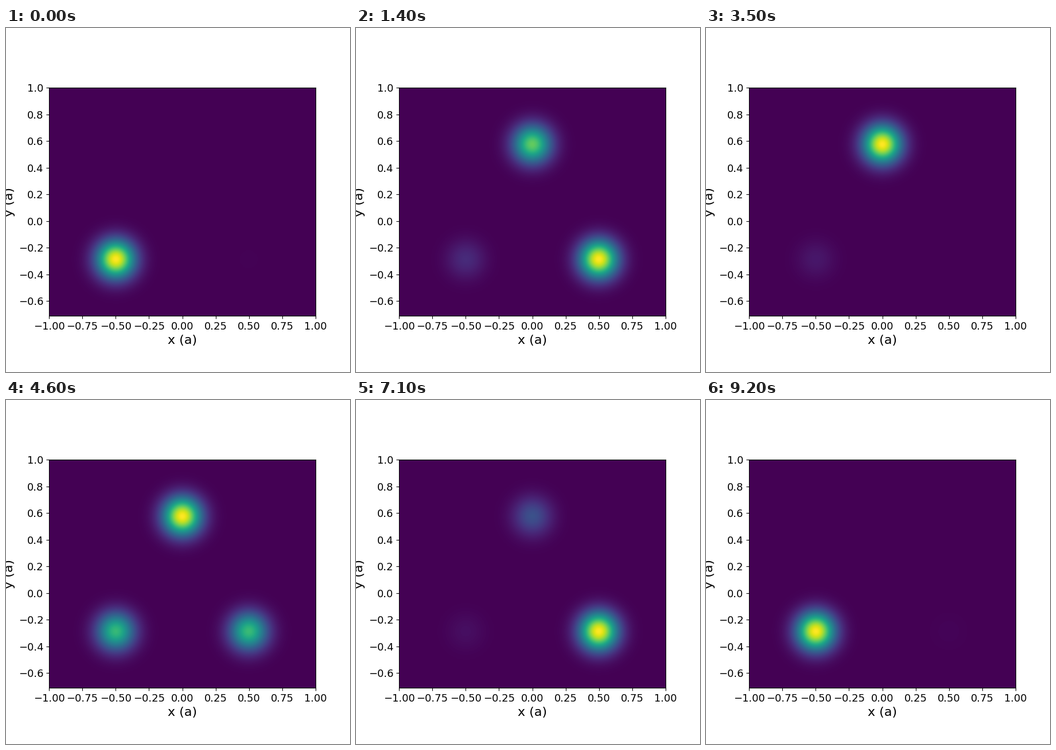
Recreate the animation shown at these times as a matplotlib script. Size 600 px wide and 600 px high, loop 9.3 s.

```python
import numpy as np
import matplotlib.pyplot as plt
from matplotlib.animation import FuncAnimation

FRAMES, INTERVAL = 93, 100
SIGMA = 0.1
HEIGHT = np.sqrt(3) / 6
Y_LOW = HEIGHT - 1

# Each site of the triangle fills in smooth pulses: (centre, width) in frames.
SITES = {
    (-0.5, -HEIGHT): [(0, 6), (24, 6.6), (44, 3.2), (77, 3.3), (93, 5)],
    (0.5, -HEIGHT): [(12, 5.2), (48, 3.2), (69, 10.5), (84, 3.2)],
    (0.0, 2 * HEIGHT): [(16.6, 4), (35, 5), (46, 5), (58, 5), (77, 5)],
}

x, y = np.meshgrid(np.linspace(-1, 1, 466), np.linspace(Y_LOW, 1, 399))


def bell(distance, width):
    return np.exp(-(distance / width) ** 2)


def blob(cx, cy):
    return bell(np.hypot(x - cx, y - cy), np.sqrt(2) * SIGMA)


BLOBS = [blob(*site) for site in SITES]


def density(step):
    total = sum(shape * sum(bell(step - centre, width) for centre, width in pulses)
                for shape, pulses in zip(BLOBS, SITES.values()))
    return total / total.max()


fig, ax = plt.subplots(figsize=(6, 6), dpi=100)
image = ax.imshow(density(0), origin="lower", extent=(-1, 1, Y_LOW, 1),
                  cmap="viridis", vmin=0, vmax=1)
ax.set_xlabel("x (a)", fontsize=16)
ax.set_ylabel("y (a)", fontsize=16)
ax.set_xticks(np.linspace(-1, 1, 9))
ax.set_yticks(np.linspace(-0.6, 1, 9))
ax.tick_params(labelsize=13)


def update(step):
    image.set_data(density(step))
    return [image]


anim = FuncAnimation(fig, update, frames=FRAMES, interval=INTERVAL,
                     repeat=True, repeat_delay=0)
plt.show()
```
